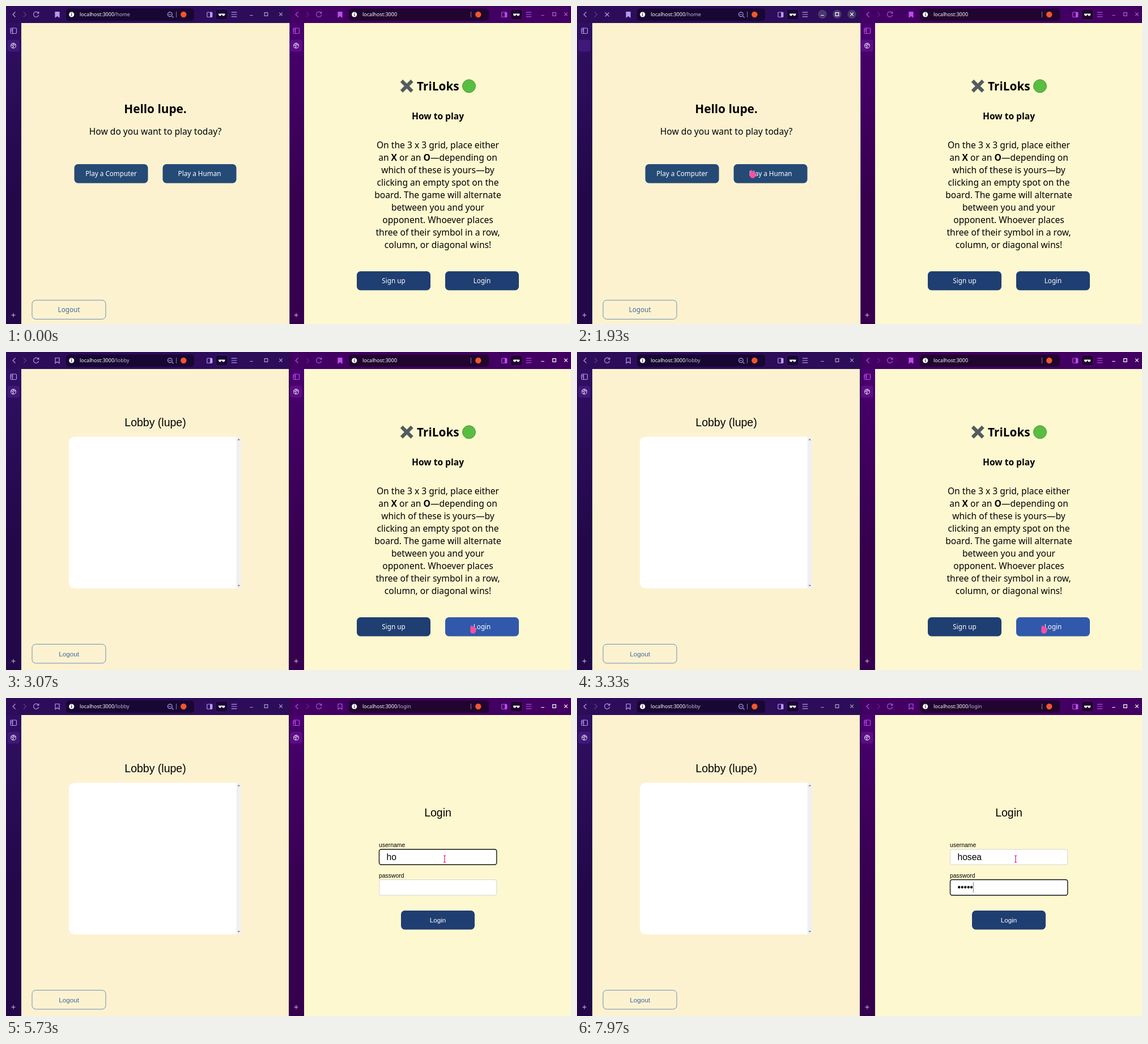
These frames come from a looping animation (997x561 px, 8000 ms). An HTML page:

```html
<!DOCTYPE html>
<html lang="en">
<head>
<meta charset="utf-8">
<title>Two-player game demo</title>
<style>
html, body { margin: 0; width: 100%; height: 100%; overflow: hidden; background: #210840; }
svg { display: block; width: 997px; height: 561px; }
text { font-family: "Noto Sans", sans-serif; font-size: 15.6px; white-space: pre; }
.plain text { font-family: "Liberation Sans", Arial, sans-serif; }
text.big { font-size: 20.8px; font-weight: 700; }
text.title { font-size: 19.5px; }
text.label { font-size: 10.4px; }
text.url { font-size: 9px; fill: #c9c2da; }
.url tspan { fill: #fff; }
.mid, .btn text { text-anchor: middle; }
.btn text { font-size: 11.7px; fill: #fff; }
.btn rect { fill: var(--fill); }
.btn.hot rect { fill: #3059ab; }
.btn.ghost rect { fill: none; stroke: #6d8fb5; }
.btn.ghost text { fill: #41699f; }
.icon { fill: none; stroke: var(--ink); stroke-width: 1.2; }
.solid { fill: var(--ink); }
.field { fill: #fff; stroke: #d3d3d3; }
.field.on { stroke: #111; stroke-width: 1.4; }
.discs { fill: #4b3a70; }
</style>
</head>
<body>
<svg id="stage" viewBox="0 0 997 561"></svg>
<script>
const LOOP = 8000;
const stage = document.getElementById('stage');
const $ = id => document.getElementById(id);
const show = (id, on) => $(id).setAttribute('display', on ? 'inline' : 'none');

const rect = (x, y, w, h, r = 0, attrs = '') =>
  `<rect x="${x}" y="${y}" width="${w}" height="${h}" rx="${r}" ${attrs}/>`;
const text = (x, y, s, cls = '', attrs = '') => `<text x="${x}" y="${y}" class="${cls}" ${attrs}>${s}</text>`;
const path = (d, cls = 'icon', attrs = '') => `<path d="${d}" class="${cls}" ${attrs}/>`;
const circle = (x, y, r, attrs = '') => `<circle cx="${x}" cy="${y}" r="${r}" ${attrs}/>`;
const group = (id, body, attrs = '') => `<g id="${id}" ${attrs}>${body}</g>`;
const button = (x, y, s, cls = '') =>
  `<g class="btn ${cls}" data-x="${x}" data-y="${y}">${rect(x, y, 130, 33.5, 6.5)}${text(x + 65, y + 21.2, s)}</g>`;

function gradient(id, top, bottom) {
  return `<linearGradient id="${id}" x2="0" y2="1"><stop stop-color="${top}"/><stop offset=".6" stop-color="${bottom}"/></linearGradient>`;
}

// Browser chrome; `k` prefixes ids, `dx` shifts the left icons, `ex` the right ones.
function chrome(k, dx, ex, barWidth, tile, bar, buttons) {
  const left = [
    path('M16.5 10.5 12 15l4.5 4.5'),
    path('M31 10.5 35.5 15 31 19.5', 'icon', 'opacity=".35"'),
    group(k + 'Reload', path('M57 12.2A4.6 4.6 0 1 0 57.6 16M57.8 9.8v3.2h-3.2')),
    group(k + 'Stop', path('M49.5 11.5l7 7m0-7l-7 7')),
    path('M87 10.5h7v9.3l-3.5-2.6-3.5 2.6z', 'icon', `id="${k}Mark"`),
    rect(106, 4.5, barWidth, 21.5, 5, `fill="${bar}"`),
    circle(115.7, 15, 4.6, 'fill="#fff"'),
    path('M115.7 14.3v3.2M115.7 12v1.2', '', `stroke="${bar}" stroke-width="1.2"`),
    text(130, 18.3, '<tspan>localhost:3000</tspan>' + `<tspan id="${k}Path" style="fill:#c0b8d2"></tspan>`, 'url'),
    rect(8, 39, 10.5, 9.5, 1.5, 'class="icon"'),
    path('M11.6 39v9.5M8.5 41.5h2.5M8.5 44h2.5'),
    rect(2.5, 59.5, 21, 21, 4, `fill="${tile}"`),
    group(k + 'Globe', circle(13, 70, 4.4, 'fill="none" stroke="#d6d0e2" stroke-width="1.1"') +
      path('M9 68.5l3 1.2 1 2-1.5 2.5M13 65.8l-.5 2 2.5 1 2-1', '', 'fill="none" stroke="#d6d0e2" stroke-width="1.3"')),
    path('M9.5 545.3h7M13 541.8v7', '', 'stroke="#cfc3e4"')
  ].join('');
  const right = [
    path('M300.5 10v10', '', 'stroke="#8d7ca8"'),
    circle(313.3, 15, 5.2, 'fill="#f4552c"'),
    rect(354.8, 11, 9, 8.5, 1, 'class="icon"'),
    path('M360 11h4v8.5h-4z', 'solid'),
    rect(370, 5.5, 21.5, 19, 4, `fill="${bar}" stroke="${tile}"`),
    path('M375 13.4h11.4v1.2q-.4 3-2.8 3-2 0-2.4-2.6h-1q-.4 2.6-2.4 2.6-2.4 0-2.8-3z', '', 'fill="#fff"'),
    path('M397.7 11.2h9.6M397.7 15h9.6M397.7 18.8h9.6')
  ].join('');
  const [a, b, c] = buttons;
  const discs = k === 'L' ? group('discs', buttons.map(x => circle(x, 14.5, 7.7)).join(''), 'class="discs"') : '';
  const controls = path(`M${a - 2.8} 16.5h5.6M${b - 2.8} 11.7h5.6v5.6h-5.6zM${c - 2.8} 11.7l5.6 5.6m0-5.6l-5.6 5.6`,
    '', `id="${k}Controls" fill="none" stroke-width="1.2"`);
  return `<g transform="translate(${dx})">${left}</g><g transform="translate(${ex})">${right}</g>${discs}${controls}`;
}

const rules = [
  'On the 3 x 3 grid, place either',
  'an <tspan font-weight="700">X</tspan> or an <tspan font-weight="700">O</tspan>—depending on',
  'which of these is yours—by', 'clicking an empty spot on the', 'board. The game will alternate',
  'between you and your', 'opponent. Whoever places', 'three of their symbol in a row,',
  'column, or diagonal wins!'
];

const home = text(263.5, 189, 'Hello lupe.', 'big mid') +
  text(263.5, 227.3, 'How do you want to play today?', 'mid') +
  button(120.5, 279, 'Play a Computer') + button(276.5, 279, 'Play a Human') +
  button(46, 519, 'Logout', 'ghost');

const lobby = text(263.5, 131, 'Lobby (lupe)', 'title mid') +
  path('M123 149.5H415V417H123Q111 417 111 405V161.500Q111 149.500 123 149.500Z', '', 'fill="#fff"') +
  rect(406.5, 149.5, 8.5, 267.5, 0, 'fill="#f0f0f0"') +
  path('M408.400 155.500l2.300-2.500 2.300 2.500zM408.400 411l2.300 2.500 2.300-2.500z', '', 'fill="#777"') +
  button(46, 515.5, 'Logout', 'ghost');

const intro = path('M698 132l18.500 18.500m0-18.500l-18.500 18.500', '', 'stroke="#545b60" stroke-width="6.200"') +
  text(762.3, 148.5, 'TriLoks', 'big mid') +
  circle(817, 141.3, 11.5, 'fill="#59bd43" stroke="#459b35"') +
  text(762, 200, 'How to play', 'mid', 'font-weight="700"') +
  rules.map((s, i) => text(762, 251 + 22 * i, s, 'mid')).join('') +
  button(619, 468, 'Sign up') + button(775, 468, 'Login');

const login = text(762, 209, 'Login', 'title mid') +
  text(658, 263.2, 'username', 'label') + rect(658.5, 267, 207.3, 27, 3.5, 'id="userBox" class="field"') +
  text(658, 317, 'password', 'label') + rect(658.5, 320.5, 207.3, 27.5, 3.5, 'id="passBox" class="field"') +
  text(671.5, 285.5, '', '', 'id="user"') + text(671.5, 339, '', '', 'id="pass"') +
  rect(0, 0, 1, 18, 0, 'id="caret" fill="#777"') +
  button(697, 375, 'Login');

stage.innerHTML = `<defs>${gradient('violet', '#311065', '#220849')}${gradient('plum', '#4b0072', '#36004f')}</defs>` +
  group('left', rect(0, 0, 501, 561, 0, 'fill="url(#violet)"') + rect(0, 0, 501, 30, 0, 'fill="#2d0d5a"') +
    rect(27, 30, 473.5, 531, 0, 'id="leftPage" fill="#fdf2d0"') +
    chrome('L', 0, 0, 226, '#40187a', '#170732', [433, 459, 485]) +
    path('M293 18l2.500 2.500M286.700 15h4.600') + circle(289.3, 14.7, 3.9, 'class="icon"'),
    'style="--ink:#b49af0;--fill:#244a75"') +
  group('right', rect(500.5, 0, 497, 561, 0, 'fill="url(#plum)"') + rect(500.5, 0, 497, 30, 0, 'fill="#410062"') +
    rect(526, 30, 471, 531, 0, 'fill="#fef8d0"') +
    chrome('R', 499, 520, 247, '#5d0c86', '#21042f', [947, 967.5, 988]),
    'style="--ink:#bd4cea;--fill:#1f3e72"') +
  rect(499, 0, 1.8, 561, 0, 'id="edge" fill="#2b1040"') +
  group('home', home, 'style="--fill:#244a75"') + group('lobby', lobby, 'class="plain"') +
  group('intro', intro, 'style="--fill:#1f3e72"') + group('login', login, 'class="plain" style="--fill:#1f3e72"') +
  group('cursor',
    path('M0 1.500Q1-1 3.500 1L8.500 5.500Q11.500 10 9 13Q5 16 1 13Q-.500 10 0 1.500Z', '', 'id="arrow"') +
    path('M-2.500 3Q-1.500-1 1 1L3.500 4.200Q7.500 3 7.500 8Q7.500 13 4 14.500Q-1 16-2.800 11Z', '', 'id="hand"') +
    path('M-2-6Q0-6 0-4Q0-6 2-6M0-4.500V4.500M-2 6Q0 6 0 4.500Q0 6 2 6', '', 'id="beam" fill="none" stroke="#e8439a" stroke-width="1.500"'),
    'fill="#fa4f9f"');

// Pointer stops: time, x, y
const stops = [[400, -14, 18], [850, 64, 45], [900, 64, 45], [1500, 308, 289], [2670, 308, 289],
  [3050, 822, 482], [3550, 822, 482], [3900, 774, 284]];
const nameKeys = [4700, 5050, 6030, 6650, 6850];
const passKeys = [7370, 7510, 7660, 7800, 7960];
const focusAt = 3930, tabAt = 7100;

function pointer(t) {
  const i = stops.findIndex(s => s[0] > t);
  if (i === 0) return stops[0].slice(1);
  if (i < 0) return stops[stops.length - 1].slice(1);
  const [t0, x0, y0] = stops[i - 1], [t1, x1, y1] = stops[i];
  const u = (t - t0) / (t1 - t0), e = u * u * (3 - 2 * u);
  return [x0 + (x1 - x0) * e, y0 + (y1 - y0) * e];
}

function drawForm(t) {
  const typed = keys => keys.filter(k => k <= t).length;
  $('user').textContent = 'hosea'.slice(0, typed(nameKeys));
  $('pass').textContent = '•'.repeat(typed(passKeys));
  const inPass = t >= tabAt;
  $('userBox').classList.toggle('on', t >= focusAt && !inPass);
  $('passBox').classList.toggle('on', inPass);
  const last = Math.max(...[focusAt, tabAt, ...nameKeys, ...passKeys].filter(k => k <= t));
  show('caret', t >= focusAt && Math.floor((t - last) / 500) % 2 === 0);
  const active = $(inPass ? 'pass' : 'user');
  const width = active.textContent ? active.getComputedTextLength() : 0;
  $('caret').setAttribute('x', 671.5 + width);
  $('caret').setAttribute('y', inPass ? 325 : 272);
}

function draw(t) {
  const [x, y] = pointer(t);
  const inLobby = t >= 2050, inLogin = t >= 3530;
  const busyL = t >= 1830 && !inLobby, busyR = t >= 3430 && !inLogin;
  const focusL = x > 0 && x < 500, focusR = x >= 500;

  show('home', !inLobby); show('lobby', inLobby);
  show('intro', !inLogin); show('login', inLogin);
  $('LPath').textContent = inLobby ? '/lobby' : '/home';
  $('RPath').textContent = inLogin ? '/login' : '';
  for (const [k, busy, moved] of [['L', busyL, inLobby], ['R', busyR, inLogin]]) {
    show(k + 'Reload', !busy); show(k + 'Stop', busy); show(k + 'Globe', !busy);
    $(k + 'Mark').setAttribute('class', moved ? 'icon' : 'icon solid');
    $(k + 'Mark').style.fill = moved ? 'none' : 'var(--ink)';
  }
  show('discs', focusL);
  show('edge', focusR);
  $('LControls').setAttribute('stroke', focusL ? '#fff' : '#aaa0c4');
  $('RControls').setAttribute('stroke', focusR ? '#fff' : '#a768bd');
  drawForm(t);

  let over = false;
  for (const b of document.querySelectorAll('.btn')) {
    const visible = b.parentNode.getAttribute('display') !== 'none';
    const dx = x - b.dataset.x, dy = y - b.dataset.y;
    const hit = visible && dx > 0 && dx < 130 && dy > 0 && dy < 33.5;
    b.classList.toggle('hot', hit && !busyL && !busyR);
    over ||= hit;
  }
  const inField = inLogin && x > 658 && x < 866 && ((y > 267 && y < 294) || (y > 320 && y < 348));
  show('hand', over); show('beam', inField); show('arrow', !over && !inField);
  $('cursor').setAttribute('transform', `translate(${x} ${y})`);
}

const start = performance.now();
function tick() {
  draw((performance.now() - start) % LOOP);
  requestAnimationFrame(tick);
}
tick();
</script>
</body>
</html>
```
